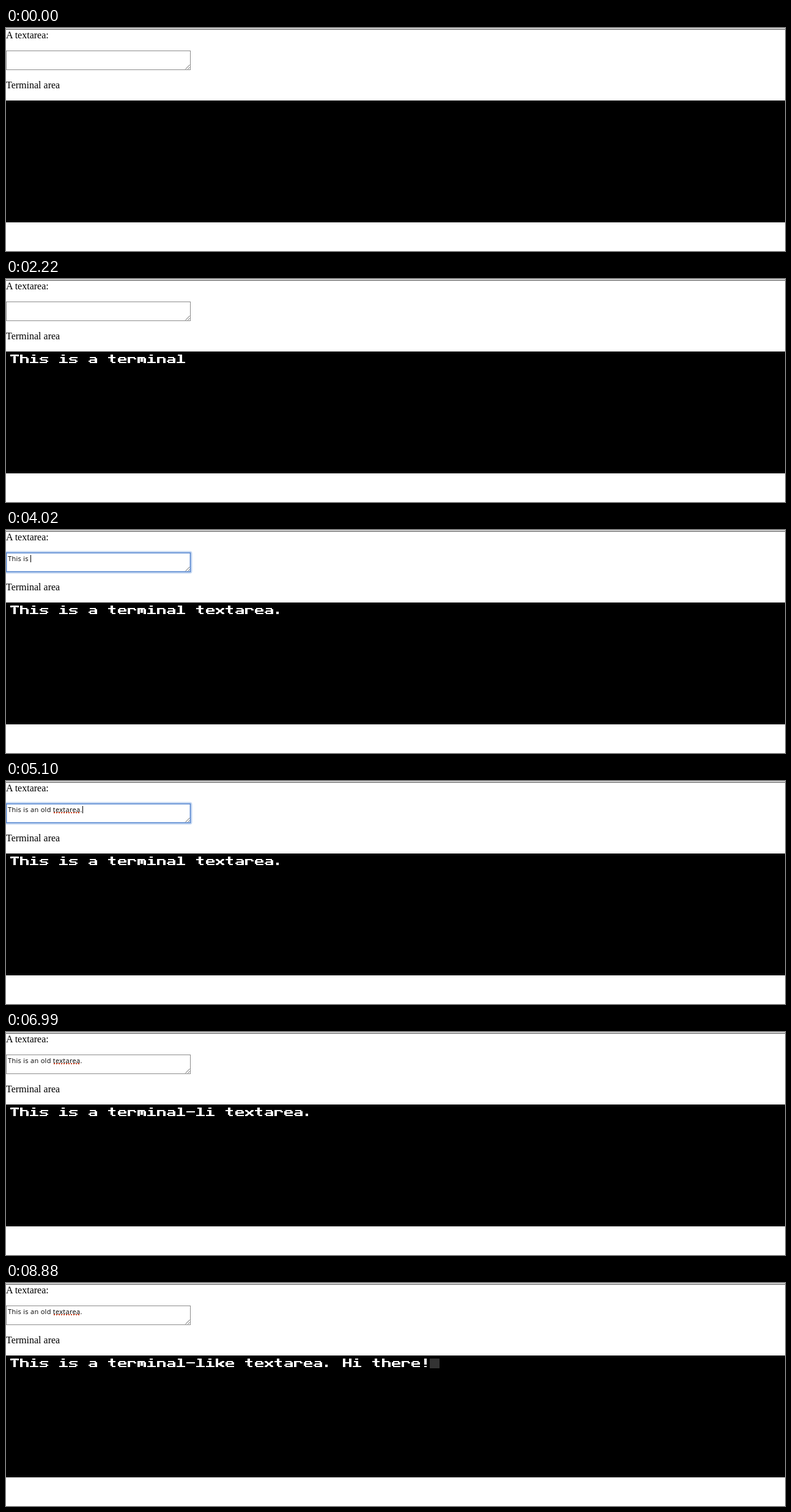
Animation of 1274 by 366 pixels, one loop 9 s. Source, as an HTML page:

```html
<!DOCTYPE html>
<html lang="en">
<meta charset="utf-8">
<title>Terminal area</title>
<style>
  html, body { margin: 0; width: 100%; height: 100%; overflow: hidden; background: #fff; }
  svg { display: block; }
  .label { font: 16px "Liberation Serif", serif; }
  .field { font: 11px "Open Sans", sans-serif; letter-spacing: .3px; white-space: pre; }
  .copy { font: 16px "Liberation Mono", monospace; letter-spacing: 6.4px; white-space: pre; fill: none; }
  .line { fill: none; shape-rendering: crispEdges; }
</style>
<svg width="1274" height="366" viewBox="0 0 1274 366">
  <rect width="1274" height="2" fill="#ccc"/>
  <rect y="2" width="1274" height="1" fill="#666"/>
  <text class="label" y="17">A textarea:</text>
  <text class="label" y="99">Terminal area</text>

  <path class="line" d="M.5 69V37.5H301.5V68.5H0" stroke="#8c8c8c"/>
  <path d="M293.500 67.500l7-7M297.500 67.500l3-3" stroke="#666"/>
  <g id="ring" fill="none">
    <rect x="-.5" y="36.500" width="303" height="33" rx="2" stroke="#8fb4e6" stroke-width="4" opacity=".5"/>
    <rect x=".5" y="37.500" width="301" height="31" stroke="#5585cf" stroke-width="1.500"/>
  </g>
  <text class="field" id="field" x="3" y="51"></text>
  <path id="spell" class="line" d="M78 51.500H122" stroke="#d2421f" stroke-width="2" stroke-dasharray="2 2"/>
  <rect id="caret" y="41" width="1" height="12"/>

  <rect y="119" width="1274" height="200"/>
  <rect id="cursor" y="124" width="16" height="16" fill="#333"/>
  <text class="copy" id="copy" x="5" y="138"></text>
  <g class="line" transform="translate(8 125) scale(2)" stroke="#fff" stroke-linecap="square">
    <g id="ink"></g>
    <use href="#ink" x="1"/>
  </g>
</svg>
<script>
const $ = id => document.getElementById(id);
const LOOP = 9000, CELL = 16;

// Block letters as pen strokes; the second pass one unit to the right thickens the stems.
const arch = 'M0 2V6M0 2H4M5 3V6';
const glyphs = {
  T: 'M0 .5V0H5V.5M2.5 0V6',
  H: 'M0 0V6M5 0V6M0 3H5',
  n: arch,
  h: arch + 'M0 0V3',
  m: arch + 'M2.5 2V5',
  i: 'M2 0h.5M1 2H2.5V6M0 6H5',
  l: 'M1 0H2.5V6M0 6H5',
  s: 'M5 2H1M0 3h0M1 4H4M5 5h0M4 6H0',
  a: 'M1 2H4M5 3V6H1M4 4H1M0 5h0',
  e: 'M5 6H1M0 3V5M1 2H4M5 3V4H0',
  t: 'M2 0V5M0 2H4M3 6H4',
  r: 'M0 2V6M1 2H4M5 3h0',
  k: 'M0 0V6M0 4H2M5 2L2 4L5 6',
  x: 'M0 2L5 6M5 2L0 6',
  '.': 'M1.5 5V6',
  '-': 'M0 3H5',
  '!': 'M2.5 0V4M2.5 6h0'
};

// Typing bursts: time of the first key, time of the last key, keys
const fieldKeys = [[3390, 3720, 'This i'], [3870, 3960, 's '], [4050, 4770, 'an old textarea.']];
const termKeys = [[390, 390, 'T'], [630, 1290, 'his is a te'], [1350, 1575, 'rminal'], [1770, 1770, ' '],
  [2430, 2790, 'textarea'], [2970, 2970, '.']];
const insertKeys = [[6700, 7140, '-like']];
const tailKeys = [[8115, 8640, ' Hi there!']];
const lit = [[870, 1320], [1770, 2220], [2670, 3120], [5730, 5820], [6270, 6700], [7110, 7310], [7890, 8340], [8790, LOOP]];

const within = (t, [from, to]) => t >= from && t < to;
const show = (id, on) => $(id).setAttribute('visibility', on ? 'visible' : 'hidden');

function typed(bursts, t) {
  return bursts.map(([from, to, keys]) => {
    const step = (to - from) / Math.max(1, keys.length - 1);
    const count = t < from ? 0 : t >= to ? keys.length : 1 + Math.floor((t - from) / step);
    return keys.slice(0, count);
  }).join('');
}

function cursorIndex(t, text, inserted) {
  if (t < 5850 || t >= 7890) return text.length;
  const moves = Math.min(10, 1 + Math.floor((t - 5850) / 70));
  return 28 - moves + inserted.length;
}

let shown;
function drawTerminal(text) {
  if (text === shown) return;
  shown = text;
  $('copy').textContent = text;
  $('ink').innerHTML = [...text].map((c, i) =>
    glyphs[c] ? `<path transform="translate(${i * CELL / 2})" d="${glyphs[c]}"/>` : '').join('');
}

function frame() {
  const t = performance.now() % LOOP;
  const base = typed(termKeys, t), inserted = typed(insertKeys, t);
  const text = base.slice(0, 18) + inserted + base.slice(18) + typed(tailKeys, t);
  drawTerminal(text);
  $('cursor').setAttribute('x', 5 + CELL * cursorIndex(t, text, inserted));
  show('cursor', lit.some(span => within(t, span)));

  const field = $('field'), value = typed(fieldKeys, t), focused = within(t, [3210, 5310]);
  if (field.textContent !== value) field.textContent = value;
  $('caret').setAttribute('x', Math.round(3 + (value ? field.getComputedTextLength() : 0)));
  show('ring', focused);
  show('caret', focused);
  show('spell', t >= 4770);
  requestAnimationFrame(frame);
}
frame();
</script>
</html>
```
